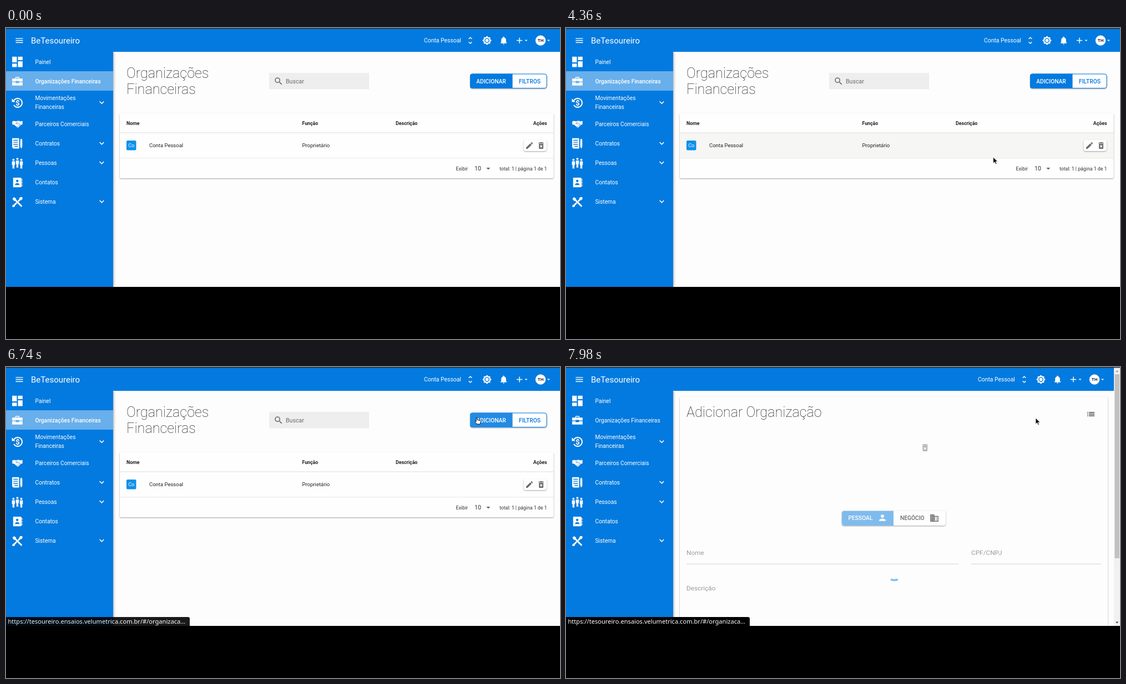
An HTML page for the animation above (8 s loop, 998 by 561 pixels).

```html
<!DOCTYPE html>
<html lang="pt-BR">
<head>
<meta charset="utf-8">
<style>
html, body { margin: 0; width: 100%; height: 100%; overflow: hidden; background: #000; }
svg { display: block; width: 998px; height: 561px; font-family: Roboto, Arial, sans-serif; }
.shadow { filter: drop-shadow(0 1px 1.2px rgba(0,0,0,.36)); }
.url { font-family: "Noto Sans", "Open Sans", sans-serif; }
</style>
</head>
<body>
<svg id="stage" viewBox="0 0 998 561"></svg>
<script>
const BLUE = '#037adf', INK = '#222', GREY = '#6a6a6a';
const BODY = 10.23, SMALL = 8.77;

const paths = {
  menu: 'M3 18h18v-2H3zm0-5h18v-2H3zm0-7v2h18V6z',
  unfold: 'M12 5.83L15.17 9l1.41-1.41L12 3 7.41 7.59 8.83 9zm0 12.34L8.83 15l-1.41 1.41L12 21l4.59-4.59L15.17 15z',
  sun: 'M20 15.31L23.31 12 20 8.69V4h-4.69L12 .69 8.69 4H4v4.69L.69 12 4 15.31V20h4.69L12 23.31 15.31 20H20zM12 18a6 6 0 1 1 0-12 6 6 0 0 1 0 12zM12 8a4 4 0 1 0 0 8 4 4 0 0 0 0-8z',
  bell: 'M12 22a2 2 0 0 0 2-2h-4a2 2 0 0 0 2 2zm6-6v-5c0-3.07-1.64-5.64-4.5-6.32V4a1.5 1.5 0 0 0-3 0v.68C7.63 5.36 6 7.92 6 11v5l-2 2v1h16v-1z',
  plus: 'M19 13h-6v6h-2v-6H5v-2h6V5h2v6h6z',
  drop: 'M7 10l5 5 5-5z',
  chevron: 'M16.59 8.59L12 13.17 7.41 8.59 6 10l6 6 6-6z',
  search: 'M15.5 14h-.79l-.28-.27A6.5 6.5 0 1 0 13.73 14.43l.27.28v.79l5 4.99L20.49 19zM9.5 14a4.5 4.5 0 1 1 0-9 4.5 4.5 0 0 1 0 9z',
  edit: 'M3 17.25V21h3.75L17.81 9.94l-3.75-3.75zM20.71 7.04c.39-.39.39-1.02 0-1.41l-2.34-2.34c-.39-.39-1.02-.39-1.41 0l-1.83 1.83 3.75 3.75z',
  trash: 'M6 19c0 1.1.9 2 2 2h8c1.1 0 2-.9 2-2V7H6zm2.46-7.12l1.41-1.41L12 12.59l2.12-2.12 1.41 1.41L13.41 14l2.12 2.12-1.41 1.41L12 15.41l-2.12 2.12-1.41-1.41L10.59 14zM15.5 4l-1-1h-5l-1 1H5v2h14V4z',
  person: 'M12 12a4 4 0 1 0 0-8 4 4 0 0 0 0 8zm0 2c-2.67 0-8 1.34-8 4v2h16v-2c0-2.66-5.33-4-8-4z',
  office: 'M12 7V3H2v18h20V7zM6 19H4v-2h2zm0-4H4v-2h2zm0-4H4V9h2zm0-4H4V5h2zm4 12H8v-2h2zm0-4H8v-2h2zm0-4H8V9h2zm0-4H8V5h2zm10 12h-8v-2h2v-2h-2v-2h2v-2h-2V9h8zm-2-8h-2v2h2zm0 4h-2v2h2z',
  list: 'M3 13h2v-2H3zm0 4h2v-2H3zm0-8h2V7H3zm4 4h14v-2H7zm0 4h14v-2H7zM7 7v2h14V7z',
  panel: 'M3 13h8V3H3zm0 8h8v-6H3zm10 0h8V11h-8zm0-18v6h8V3z',
  briefcase: 'M9 4h6l1 3h5v5h-6v-1H9v1H3V7h5zM9.8 5.5L9.3 7h5.4l-.5-1.5zM3 13.2h6v1.6h6v-1.6h6V19H3z',
  contract: 'M3 3h12v18H6a3 3 0 0 1-3-3zM5 6v1.4h8V6zM5 9.5v1.4h8V9.5zM5 13v1.4h8V13zM7 16.5v1.4h6v-1.4zM17 6l1.7-2.5L20.5 6v12L18.7 21 17 18z',
  people: [5.2, 12, 18.8].map((x, i) => {
    const y = i == 1 ? 3 : 4.5;
    return `M${x} ${y}a1.9 1.9 0 1 0 .01 0zM${x - 2.6} ${y + 4.6}h5.2v6.4h-1v6h-3.2v-6h-1z`;
  }).join(''),
  book: 'M4 3h14a2 2 0 0 1 2 2v14a2 2 0 0 1-2 2H4zM11.7 7a2.3 2.3 0 1 0 .01 0zM7.5 17h8.4c0-5-8.4-5-8.4 0zM20.6 6h1v3h-1zm0 5h1v3h-1zm0 5h1v3h-1z'
};

const rect = (x, y, w, h, fill, more = '') =>
  `<rect x="${x}" y="${y}" width="${w}" height="${h}" fill="${fill}" ${more}/>`;
const text = (x, y, s, size, fill, more = '') =>
  `<text x="${x}" y="${y}" font-size="${size}" fill="${fill}" ${more}>${s}</text>`;
const place = (body, x, y, size) =>
  `<g transform="translate(${x - size / 2} ${y - size / 2}) scale(${size / 24})">${body}</g>`;
const icon = (name, x, y, size = 17.5, fill = '#fff') =>
  place(`<path d="${paths[name]}" fill="${fill}" fill-rule="evenodd"/>`, x, y, size);
const stroke = (d, w, color = '#fff') =>
  `<path d="${d}" fill="none" stroke="${color}" stroke-width="${w}" stroke-linecap="round"/>`;
const title = (y, s, fill) => text(217, y, s, 25.2, fill, 'font-weight="100"');
const MID = 'text-anchor="middle"', END = 'text-anchor="end"', MEDIUM = 'font-weight="500"', BOLD = 'font-weight="700"';

const money = '<circle cx="12.5" cy="12" r="7.7" fill="none" stroke="#fff" stroke-width="2" stroke-dasharray="40 8.4" transform="rotate(-150 12.5 12)"/>'
  + '<path d="M2.5 4.5v6h6z" fill="#fff"/>' + text(12.5, 16.4, '$', 12.5, '#fff', MID + BOLD);
const handshake = '<path d="M2 7l4-1 3 1 3-1 3 0 3 1 4-1v7l-3 1-5 5-2 0-6-5-4-1z" fill="#fff"/>'
  + stroke('M12 8l-3 3 2 1 2.5-1.6 5 4M13 18l-2-2M16 16l-2-2', .9, BLUE);
const tools = stroke('M6 6l13 13', 3) + stroke('M14 10l4.5-4.5M5 19l5-5', 2.6)
  + '<path d="M3 6l3-3 4 3-1 3-3 1zM17 3l4 0 0 4-3 2-3-3zM3 18l3-2 2 3-2 2-3 0z" fill="#fff"/>';

const menu = [
  ['Painel', 61, icon('panel', 20.5, 61, 25)],
  ['', 96, icon('briefcase', 20.5, 96.5, 25)],
  ['', 134.5, place(money, 20.5, 135, 25), 1],
  ['Parceiros Comerciais', 173, place(handshake, 20.5, 173, 22)],
  ['Contratos', 208, icon('contract', 20.5, 208, 25), 1],
  ['Pessoas', 243, icon('people', 20.5, 243.5, 25), 1],
  ['Contatos', 278, icon('book', 20.5, 278.5, 23)],
  ['Sistema', 313, place(tools, 20.5, 314, 24), 1]
];
const menuLine = (y, s, more) => text(52.5, y, s, BODY, '#fff', more);

const frame = rect(0, 0, 998, 467, '#fdfdfd');
const sidebar = `<g style="filter:drop-shadow(1px 0 2px rgba(0,0,0,.35))">${rect(0, 43, 193, 424, BLUE)}</g>`
  + rect(0, 78, 193, 35, '#68afeb', 'id="active"')
  + menu.map(([s, y, art, more]) => art + menuLine(y + 3.6, s) + (more ? icon('chevron', 172.5, y) : '')).join('')
  + menuLine(130, 'Movimentações') + menuLine(145.5, 'Financeiras')
  + `<g id="strong">${menuLine(99.5, 'Organizações Financeiras', MEDIUM)}</g>`
  + `<g id="plain">${menuLine(99.5, 'Organizações Financeiras')}</g>`;
const header = rect(0, 0, 998, 2, '#2b2f33') + rect(0, 1.5, 998, 41.5, BLUE)
  + icon('menu', 24, 22.5) + text(45, 27.5, 'BeTesoureiro', 15, '#fff')
  + '<g id="tools">' + text(753, 26.2, 'Conta Pessoal', 10.4, '#fff')
  + icon('unfold', 836.5, 22.5) + icon('sun', 866.5, 22.5) + icon('bell', 896.5, 22.5)
  + icon('plus', 925, 22.5) + icon('drop', 937, 22.5, 12)
  + '<circle cx="963" cy="22.5" r="9.2" fill="#fff"/>' + text(963, 25.4, 'TH', 8, INK, MID + BOLD)
  + icon('drop', 977.5, 22.5, 12) + '</g>';

const th = (x, s, more = '') => text(x, 174.5, s, SMALL, INK, BOLD + more);
const listPage = title(90, 'Organizações', INK) + title(119, 'Financeiras', INK)
  + rect(474, 81, 180, 29.5, '#eee') + icon('search', 491, 96, 18, '#616161') + text(504, 99.5, 'Buscar', 10.6, GREY)
  + `<g class="shadow">${rect(836.5, 83, 137.5, 25.5, '#fff', `rx="4" stroke="${BLUE}"`)}</g>`
  + '<path id="add" d="M912.5 82.5V109H840a4 4 0 0 1-4-4V86.500a4 4 0 0 1 4-4z"/>'
  + text(874, 99.5, 'ADICIONAR', BODY, '#fff', MID + MEDIUM) + text(943.5, 99.5, 'FILTROS', BODY, BLUE, MID + MEDIUM)
  + `<g class="shadow">${rect(205, 154, 781.5, 117, '#fefefe', 'rx="2"')}</g>`
  + rect(205, 189, 781.5, 45.5, '#f1f1ef', 'id="row"')
  + rect(205, 188.5, 781.5, 1, '#deded8') + rect(205, 234.3, 781.5, 1, '#e6e6de')
  + th(217, 'Nome') + th(533.5, 'Função') + th(702, 'Descrição') + th(974.5, 'Ações', END)
  + rect(217, 203, 17.5, 17.5, '#0d90e9', 'rx="2"') + text(225.8, 215, 'Co', 8.77, '#fff', MID)
  + text(258, 215, 'Conta Pessoal', 9.5, INK) + text(533.5, 215, 'Proprietário', 9.5, INK)
  + `<g class="shadow">${rect(932.5, 202, 41.5, 20, '#fff', 'rx="4"')}</g>`
  + icon('edit', 943, 212, 16, GREY) + icon('trash', 964, 212, 16, GREY)
  + text(810.5, 256.5, 'Exibir', SMALL, '#333') + text(844, 257, '10', 10.6, '#333') + icon('drop', 868.8, 253.3, 17, '#666')
  + text(974.5, 256.5, 'total: 1 | página 1 de 1', SMALL, '#333', END);

const label = (x, y, s) => text(x, y, s, 11.8, '#9b9b9b');
const formPage = `<g class="shadow">${rect(205, 54, 771, 425, '#fdfdfd', 'rx="2"')}</g>`
  + title(90, 'Adicionar Organização', INK) + icon('list', 945.5, 85, 17.5, '#444')
  + icon('trash', 646.8, 145.5, 17.5, '#b4b4b4')
  + `<g class="shadow">${rect(497, 259.5, 187, 26.5, '#fefefe', 'rx="4"')}</g>`
  + '<path d="M590 259.500V286H501a4 4 0 0 1-4-4V263.500a4 4 0 0 1 4-4z" fill="#7fbbed"/>'
  + text(508.5, 276, 'PESSOAL', BODY, '#fff', MEDIUM) + icon('person', 570, 272)
  + text(602, 276, 'NEGÓCIO', BODY, GREY, MEDIUM) + icon('office', 663.5, 272.5, 17.5, GREY)
  + label(217, 339, 'Nome') + label(730, 339, 'CPF/CNPJ') + label(217, 403, 'Descrição')
  + rect(217, 354.7, 490, 1, '#d3d3df') + rect(730, 354.7, 233.5, 1, '#d3d3df')
  + '<circle id="spinner" cx="591.5" cy="368" r="16.5" fill="none" stroke="#84bfee" stroke-width="3.6"/>';
const scrollbar = rect(987, 1.5, 11, 465.5, '#f1f1f1') + rect(988.5, 13, 8.5, 332, '#c1c1c1')
  + '<path d="M990 9l2.700-3 2.700 3z" fill="#999"/><path d="M990 459.500l2.700 3 2.700-3z" fill="#444"/>';
const status = '<path d="M0 451h328a3 3 0 0 1 3 3v13H0z"/>'
  + text(3.5, 462.5, 'https://tesoureiro.ensaios.velumetrica.com.br/#/organizaca…', 11.1, '#fff', 'class="url"');
const pointer = '<path id="arrow" d="M0 0v11l2.600-2.400 1.800 3.900 1.900-.8-1.800-3.800h3.600z" fill="#111" stroke="#fff" stroke-width=".7"/>'
  + '<path id="hand" d="M1 5V0q1-2 2 0v3.500l4.500.9q1.600.4 1.500 2L8.300 11h-6L-1.500 6.500q0-2 2.500 0z" fill="#fff" stroke="#111"/>';

stage.innerHTML = frame + `<g id="list">${listPage}</g><g id="form">${formPage}</g>` + sidebar + header
  + `<g id="scroll">${scrollbar}</g>` + rect(0, 467, 998, 94, '#000')
  + `<g id="status">${status}</g><g id="pointer">${pointer}</g>`;

const LOOP = 8000, SWITCH = 6900;
const track = [
  [3400, 967, 252], [3800, 862, 241], [4180, 772, 247], [4920, 762, 190],
  [5020, 757, 163], [5040, 755, 154], [5760, 836, 101], [5880, 836, 101], [6260, 846, 92]
];
const $ = id => document.getElementById(id);
const ramp = (t, a, b) => Math.min(1, Math.max(0, (t - a) / (b - a)));
const show = (id, on) => $(id).setAttribute('visibility', on ? 'visible' : 'hidden');
const fade = (id, v) => $(id).setAttribute('opacity', v);

function pointerAt(t) {
  let [, x, y] = track[0];
  for (let i = 1; i < track.length; i++) {
    const [t0, x0, y0] = track[i - 1], [t1, x1, y1] = track[i], k = ramp(t, t0, t1);
    if (t >= t0) { x = x0 + (x1 - x0) * k; y = y0 + (y1 - y0) * k; }
  }
  return [x, y];
}

function draw(t) {
  const onForm = t >= SWITCH, hover = t >= 5940 && !onForm, moved = t >= 3420;
  for (const id of ['form', 'scroll', 'plain']) show(id, onForm);
  for (const id of ['list', 'strong']) show(id, !onForm);
  $('tools').setAttribute('transform', `translate(${onForm ? -11 : 0} 0)`);
  $('add').setAttribute('fill', hover ? '#238be3' : BLUE);
  fade('row', ramp(t, 4280, 4430) - ramp(t, 5060, 5240));
  fade('active', 1 - ramp(t, 7540, 7800));
  fade('status', ramp(t, 6540, 6765));

  $('pointer').setAttribute('transform', `translate(${pointerAt(t)})`);
  show('arrow', moved && !hover);
  show('hand', hover);

  const span = 45 * ramp(t, 7600, 7980), mid = 90 - (7980 - t) * 360 / 1333;
  const arc = span * 16.5 * Math.PI / 180;
  $('spinner').setAttribute('stroke-dasharray', `${arc} 200`);
  $('spinner').setAttribute('transform', `rotate(${mid - span / 2} 591.5 368)`);
  show('spinner', t > 7620);
}

const start = performance.now();
function tick() {
  draw((performance.now() - start) % LOOP);
  requestAnimationFrame(tick);
}
tick();
</script>
</body>
</html>
```
